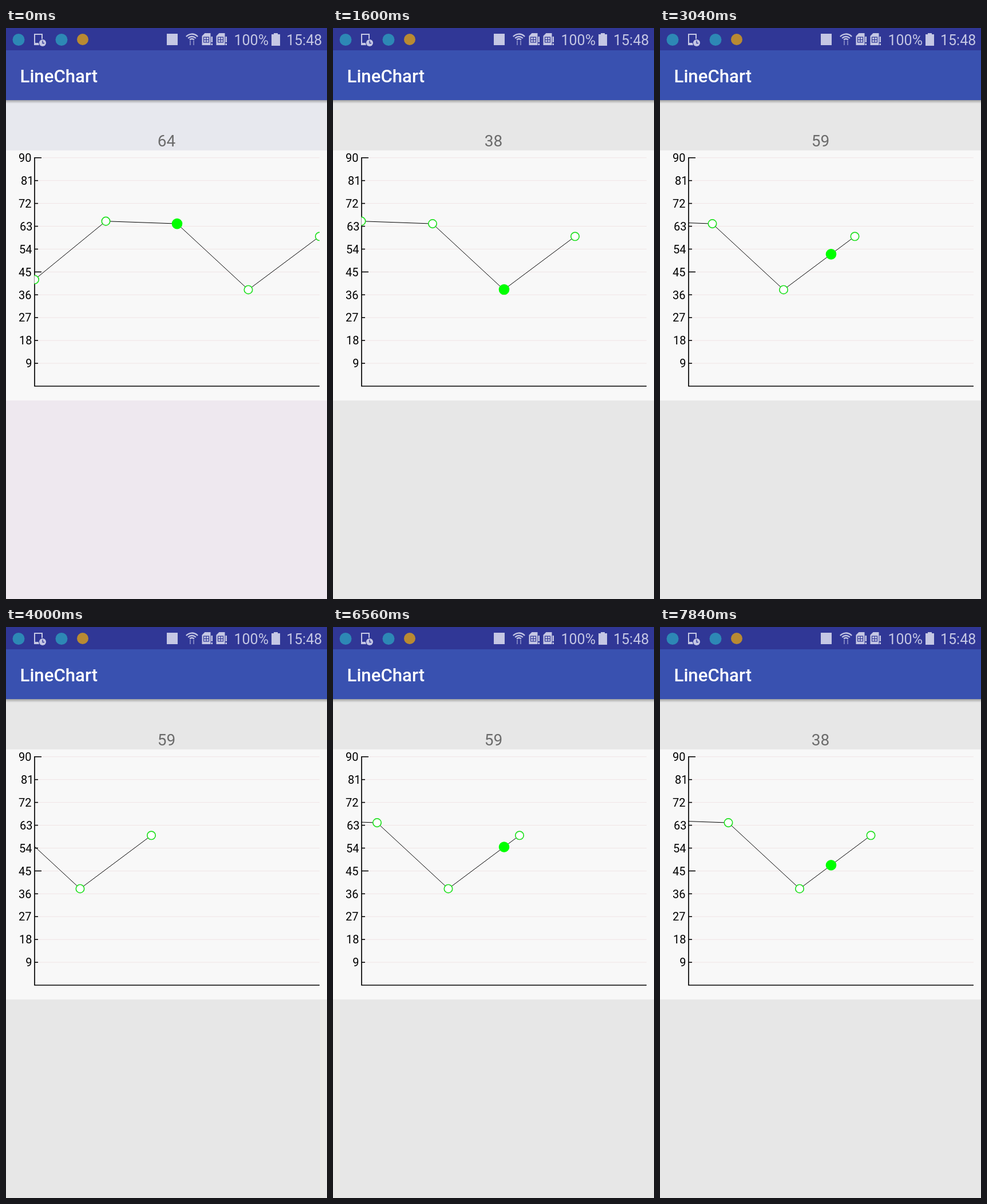
These frames come from a looping animation (561 by 998 pixels, 8000 ms). An HTML page with a canvas:

```html
<!DOCTYPE html>
<html lang="en">
<head>
<meta charset="utf-8">
<title>LineChart</title>
<style>
html, body { margin: 0; width: 100%; height: 100%; overflow: hidden; }
canvas { display: block; }
</style>
</head>
<body>
<canvas id="stage" width="561" height="998"></canvas>
<script>
const ctx = document.getElementById('stage').getContext('2d');
const LOOP = 8000, STEP = 160;
const LEFT = 50, RIGHT = 548, CENTER = 299, BASE = 626, SPACING = 124.5, UNIT = 4.436;
const values = [42, 65, 64, 38, 59];
// [time, x of the last data point]
const drag = [[0, 548], [1600, 423], [3040, 340.5], [3360, 328], [4000, 254],
  [5280, 183], [6560, 326], [7840, 368.5]];
const ICON = '#c5c7e4', STATUS = '#303796';

const yOf = value => BASE - value * UNIT;

function rect(x, y, w, h, color) {
  ctx.fillStyle = color;
  ctx.fillRect(x, y, w, h);
}

function disc(x, y, r, color) {
  ctx.fillStyle = color;
  ctx.beginPath();
  ctx.arc(x, y, r, 0, 7);
  ctx.fill();
}

function line(points, color, width) {
  ctx.strokeStyle = color;
  ctx.lineWidth = width;
  ctx.beginPath();
  points.forEach(([x, y]) => ctx.lineTo(x, y));
  ctx.stroke();
}

function text(str, x, y, font, color, align = 'left') {
  ctx.font = font + ' Roboto, sans-serif';
  ctx.fillStyle = color;
  ctx.textAlign = align;
  ctx.fillText(str, x, y);
}

// Monotone cubic interpolation through the drag keys
const secant = i => (drag[i + 1][1] - drag[i][1]) / (drag[i + 1][0] - drag[i][0]);
function slope(i) {
  if (i === 0 || i === drag.length - 1) return 0;
  const a = secant(i - 1), b = secant(i);
  return a * b > 0 ? 2 * a * b / (a + b) : 0;
}
function lastX(t) {
  const i = Math.min(drag.length - 2, drag.findLastIndex(key => key[0] <= t));
  const [t0, x0] = drag[i], [t1, x1] = drag[i + 1];
  const span = t1 - t0, u = Math.min(1, (t - t0) / span), v = 1 - u;
  return v * v * (1 + 2 * u) * x0 + u * u * (3 - 2 * u) * x1 +
    span * u * v * (v * slope(i) - u * slope(i + 1));
}

function simCard(x) {
  ctx.fillStyle = ICON;
  ctx.beginPath();
  [[0, 14], [5, 9], [15, 9], [15, 30], [0, 30]].forEach(([dx, y]) => ctx.lineTo(x + dx, y));
  ctx.fill();
  ctx.strokeStyle = STATUS;
  ctx.lineWidth = 1.2;
  ctx.strokeRect(x + 3, 16, 9, 9);
  line([[x + 7.5, 16], [x + 7.5, 25]], STATUS, 1.2);
  line([[x + 3, 20.5], [x + 12, 20.5]], STATUS, 1.2);
  rect(x + 16, 15, 2.5, 10, ICON);
  rect(x + 16, 27, 2.5, 3, ICON);
}

function statusBar() {
  rect(0, 0, 561, 39, STATUS);
  disc(22, 20.5, 10.5, '#2d88b5');
  disc(97, 20.5, 10.5, '#2d88b5');
  disc(134, 20, 10, '#b98a32');

  ctx.strokeStyle = ICON;
  ctx.lineWidth = 2;
  ctx.strokeRect(50, 11, 13, 18);
  rect(49, 26, 10, 4, ICON);
  disc(64, 26, 7, STATUS);
  disc(64, 26, 6, ICON);
  line([[64, 22], [64, 26.5], [67, 26.5]], STATUS, 1.3);

  rect(281, 10, 19, 20, ICON);

  ctx.strokeStyle = ICON;
  ctx.lineWidth = 2.3;
  for (const r of [5, 9, 13.5]) {
    ctx.beginPath();
    ctx.arc(325, 24, r, -Math.PI * .77, -Math.PI * .23);
    ctx.stroke();
  }
  line([[322, 22], [322, 30]], '#7b80bf', 2);
  line([[328, 22], [328, 30]], '#7b80bf', 2);
  simCard(342.5);
  simCard(367.5);
  text('100%', 398.5, 30, '25px', ICON);
  rect(468, 9, 7, 3, ICON);
  rect(464, 11, 15, 20, ICON);
  text('15:48', 490, 30, '25px', ICON);
}

function background(tinted) {
  rect(0, 126, 561, 88, tinted ? '#e7e8ee' : '#e7e7e7');
  rect(0, 651, 561, 347, tinted ? '#eee8ef' : '#e7e7e7');
  rect(0, 214, 561, 437, '#f8f8f8');
  rect(0, 39, 561, 87, tinted ? '#3d4fae' : '#3951b0');
  const shadow = ctx.createLinearGradient(0, 126, 0, 132);
  shadow.addColorStop(0, 'rgba(0,0,0,.3)');
  shadow.addColorStop(1, 'rgba(0,0,0,0)');
  rect(0, 126, 561, 6, shadow);
  statusBar();
  text('LineChart', 24.5, 95, '500 31.2px', '#fff');
}

function axes() {
  for (let v = 9; v <= 90; v += 9) {
    const y = yOf(v), label = String(v);
    line([[LEFT, y], [RIGHT, y]], '#f0e4e5', 1);
    line([[LEFT, y], [LEFT + (v % 45 ? 6 : 12), y]], '#000', 1.6);
    ctx.font = '20px Roboto, sans-serif';
    ctx.textAlign = 'left';
    const box = ctx.measureText(label);
    const inkWidth = box.actualBoundingBoxLeft + box.actualBoundingBoxRight;
    text(label, 44.3 - inkWidth, y + 7.2, '20px', '#000');
  }
  line([[LEFT, yOf(90) - .8], [LEFT, BASE], [RIGHT, BASE]], '#000', 1.7);
}

function chart(endX) {
  const points = values.map((v, i) => [endX - (values.length - 1 - i) * SPACING, yOf(v)]);
  ctx.save();
  ctx.beginPath();
  ctx.rect(LEFT - .5, 214, RIGHT - LEFT + .5, 437);
  ctx.clip();
  line(points, '#000', 1);
  for (const [x, y] of points) {
    disc(x, y, 7.2, '#fff');
    ctx.strokeStyle = '#20e020';
    ctx.lineWidth = 1.7;
    ctx.stroke();
  }
  if (endX >= CENTER) {
    const i = Math.min(points.length - 2, points.findLastIndex(p => p[0] <= CENTER));
    const [x0, y0] = points[i], y1 = points[i + 1][1];
    disc(CENTER, y0 + (y1 - y0) * (CENTER - x0) / SPACING, 9.3, '#0f0');
  }
  ctx.restore();
  const nearest = Math.min(values.length - 1,
    Math.round(values.length - 1 - (endX - CENTER) / SPACING));
  text(values[nearest], 280.5, 207, '28px', '#6b6b6b', 'center');
}

function frame() {
  const t = Math.floor(performance.now() % LOOP / STEP) * STEP;
  background(t < STEP);
  axes();
  chart(lastX(t));
  requestAnimationFrame(frame);
}
frame();
</script>
</body>
</html>
```
